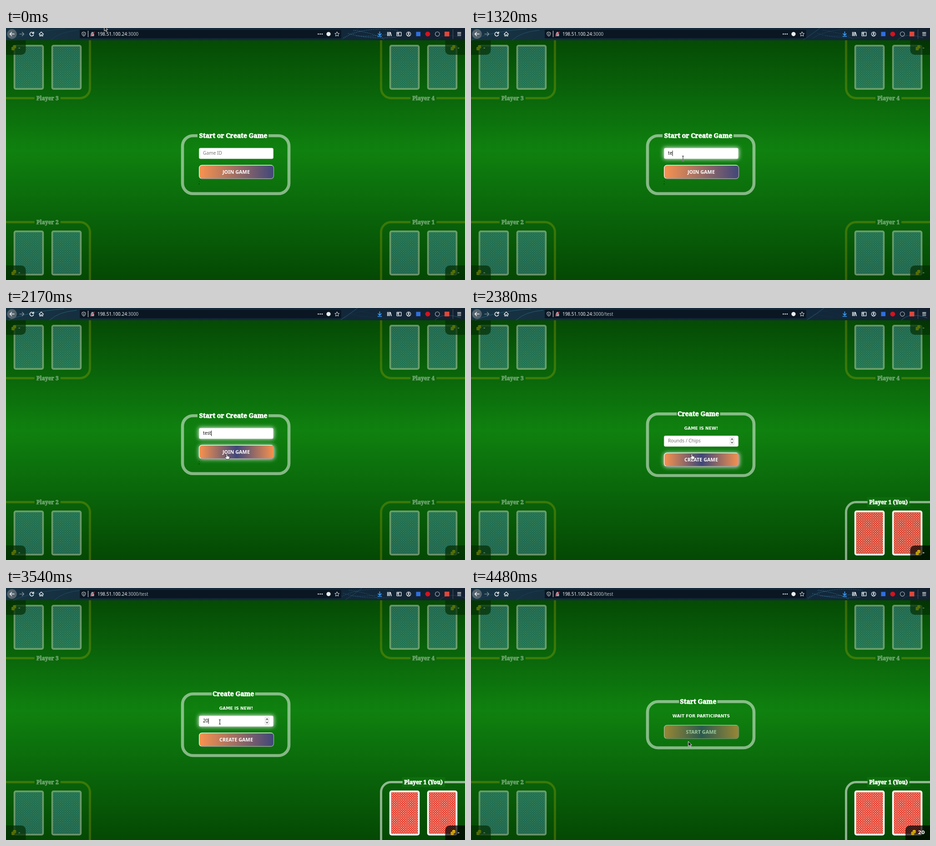
An HTML page for the animation above (4.58 s loop, 1009x555 px).

```html
<!DOCTYPE html>
<html lang="en">
<head>
<meta charset="utf-8">
<title>Card table</title>
<style>
  html, body { margin: 0; width: 100%; height: 100%; overflow: hidden; background: #064a06; }
  svg { display: block; width: 100%; height: 100%; }
  text { font-family: "Noto Sans", "Open Sans", sans-serif; white-space: pre; }
  .slab { font: 900 14px "Noto Serif", serif; fill: #fff; stroke: #fff; stroke-width: .85; text-anchor: middle; }
  .name { font-size: 12.1px; }
  .note { font: bold 9.15px "DejaVu Sans", sans-serif; fill: #fff; text-anchor: middle; }
  .chips { font: bold 10.8px "DejaVu Sans", sans-serif; fill: #fff; }
  .label { font-size: 10.9px; font-weight: 600; fill: #fff; text-anchor: middle; }
  .field { font-size: 10.2px; }
  .url { font-size: 9.95px; fill: #f4f6f8; }
  .icon { fill: none; stroke: #eef1f4; stroke-width: 1.3; stroke-linecap: round; stroke-linejoin: round; }
</style>
</head>
<body>
<svg id="stage" viewBox="0 0 1009 555"></svg>
<script>
const LOOP = 4580;
// [first, last, number of repaints]
const BURSTS = [[100, 460, 5], [670, 1130, 6], [1230, 1720, 6], [1800, 2280, 6],
  [2380, 2860, 6], [2940, 3250, 4], [3450, 3900, 6], [3990, 4480, 6]];
const STEPS = [0, ...BURSTS.flatMap(([a, b, n]) =>
  Array.from({ length: n }, (_, i) => Math.floor((a + (b - a) * i / (n - 1)) / 10) * 10))];

const CREATE_AT = 2170, START_AT = 4170;
// [time, x, y]
const POINTER = [[0, 216, -4], [60, 216, -4], [460, 476, 290], [600, 476, 290], [740, 469, 295],
  [850, 466, 287], [1420, 466, 287], [1720, 485, 324], [1900, 485.5, 321.8], [2470, 485.5, 321.8],
  [2570, 482, 314], [2860, 476, 307], [3150, 470, 295], [3630, 470, 295], [3900, 476, 320],
  [4000, 477, 330], [4080, 478.5, 337], [4580, 477.5, 338]];
const TYPED = [[1230, "t"], [1320, "te"], [1420, "tes"], [1520, "test"], [CREATE_AT, ""], [3450, "2"], [3540, "20"]];
const FOCUS = [[840, CREATE_AT], [3150, START_AT]];
const HOVER = [[1650, 2420], [3860, LOOP + 500]];

const clamp = v => Math.max(0, Math.min(1, v));
const $ = id => document.getElementById(id);
const show = (id, on) => $(id).setAttribute("display", on ? "inline" : "none");
const set = (id, attrs) => { for (const k in attrs) $(id).setAttribute(k, attrs[k]); };

// Rises and falls over a short ease at the ends of each window.
const windowed = (t, list, ease) => Math.max(...list.map(([a, b]) =>
  Math.min(clamp((t - a) / ease), 1 - clamp((t - b) / ease))));

function pointerAt(t) {
  const i = POINTER.findIndex(p => p[0] > t);
  const [a, x0, y0] = POINTER[i - 1], [b, x1, y1] = POINTER[i];
  const k = (t - a) / (b - a), e = k * k * (3 - 2 * k);
  return [x0 + (x1 - x0) * e, y0 + (y1 - y0) * e];
}

const defs = `<defs>
  <linearGradient id="felt" x2="0" y2="1">
    <stop stop-color="#054a05"/><stop offset=".46" stop-color="#0f810f"/><stop offset="1" stop-color="#044804"/>
  </linearGradient>
  <linearGradient id="bar"><stop stop-color="#173444"/><stop offset=".3" stop-color="#142a3b"/>
    <stop offset=".78" stop-color="#12283a"/><stop offset="1" stop-color="#13202f"/></linearGradient>
  <linearGradient id="sweep" gradientUnits="userSpaceOnUse" x1="425" x2="755" y1="0" y2="0">
    <stop stop-color="#f8924f"/><stop offset=".5" stop-color="#40477a"/><stop offset="1" stop-color="#f8924f"/>
  </linearGradient>
  <linearGradient id="bevel" x2="1" y2="1"><stop offset=".5" stop-color="#f1f1f1"/><stop offset=".5" stop-color="#a3a1a6"/></linearGradient>
  <filter id="blur" x="-20%" y="-100%" width="140%" height="300%"><feGaussianBlur stdDeviation="5"/></filter>
  ${[["blue", "#3a8cbe", "#88b9cf"], ["red", "#e03626", "#f8b3a6"]].map(([id, base, line]) => `
  <pattern id="${id}" width="5" height="5" patternUnits="userSpaceOnUse">
    <rect width="5" height="5" fill="${base}"/>
    <path d="M-1 -1L6 6M6 -1L-1 6" stroke="${line}" stroke-width=".95"/></pattern>`).join("")}
</defs>`;

// Rounded outline with an opening for the heading.
const outline = (top, bottom, gap) => `<path fill="none" stroke="#fff" stroke-opacity=".5" stroke-width="6.6"
  d="M${504.5 + gap[1]} ${top}H599a23 23 0 0 1 23 23V${bottom - 23}a23 23 0 0 1 -23 23H411a23 23 0 0 1 -23 -23V${top + 23}a23 23 0 0 1 23 -23H${504.5 + gap[0]}"/>`;

const heading = (x, y, s) => `<text class="slab" x="${x}" y="${y}">${s}</text>`;

const input = (id, y, hint) => `
  <rect id="${id}Glow" x="423" y="${y - 1}" width="166" height="26" rx="4" fill="#fff" filter="url(#blur)"/>
  <rect x="424.4" y="${y + .4}" width="163.2" height="23.6" rx="3" fill="#fff" stroke="#c9d6c9" stroke-width=".8"/>
  <text class="field" id="${id}Hint" x="433" y="${y + 15.4}" fill="#757575">${hint}</text>
  <text class="field" id="${id}Text" x="433" y="${y + 15.4}" fill="#111"></text>
  <path id="${id}Caret" stroke="#111" stroke-width="1"/>`;

const button = (id, y, s) => `
  <rect id="${id}Glow" x="423.5" y="${y - .5}" width="167" height="32" rx="7" fill="#fff" filter="url(#blur)"/>
  <rect x="424.7" y="${y + .2}" width="163.8" height="29.6" rx="6" fill="url(#sweep)" stroke="url(#bevel)" stroke-width="1.4"/>
  <text class="label" x="506" y="${y + 18.9}">${s}</text>`;

const spinner = `<g fill="#fff" stroke="#bbb" stroke-width=".7">
  <rect x="569.5" y="284.5" width="8.6" height="8.2" rx="2"/><rect x="569.5" y="292.7" width="8.6" height="8.2" rx="2"/></g>
  <path d="M571.8 290l2-2 2 2M571.8 295.4l2 2 2-2" fill="none" stroke="#222" stroke-width="1.3"/>`;

const pages = `
<g id="join">${outline(237.2, 364.8, [-83.5, 72.5])}${heading(499.7, 242.3, "Start or Create Game")}
  ${input("game", 264, "Game ID")}${button("joinBtn", 302, "JOIN GAME")}
  <text x="423.5" y="343" font-size="10" fill="#0a1a0a">;</text></g>
<g id="create">${outline(233.2, 369, [-52, 43])}${heading(499.7, 238.3, "Create Game")}
  <text class="note" x="506" y="268.4">GAME IS NEW!</text>
  ${input("rounds", 281, "Rounds / Chips")}${spinner}${button("createBtn", 319, "CREATE GAME")}</g>
<g id="start">${outline(250.3, 352, [-47, 37])}${heading(499.5, 255.3, "Start Game")}
  <text class="note" x="506" y="285.4">WAIT FOR PARTICIPANTS</text>
  <g opacity=".6">${button("startBtn", 302, "START GAME")}</g></g>`;

const coin = (x, y) => `<ellipse cx="${x}" cy="${y}" rx="3.7" ry="1.7"/>`;
const coins = (x, y) => `<g fill="#f4c20d" stroke="#4a4405" stroke-width=".5" transform="translate(${x} ${y})">
  ${coin(4, 9.5)}${coin(4, 7.4)}${coin(4, 5.3)}${coin(7.3, 5.4)}${coin(7.3, 3.4)}${coin(7.3, 1.4)}</g>`;

function seat(id, name, right, low, active) {
  const flip = `matrix(${right ? -1 : 1} 0 0 ${low ? -1 : 1} ${right ? 1009 : 0} ${low ? 582 : 0})`;
  const mid = right ? 917.7 : 91.3, y = low ? 432 : 158.6, row = low ? 533 : 38;
  const edge = active ? `stroke="#fff" stroke-opacity=".55"` : `stroke="#ffd700" stroke-opacity=".5"`;
  const half = active ? 46 : 28.5;
  const card = x => `<rect x="${x}" y="37" width="66.5" height="99" rx="5" fill="#fff"/>
    <rect x="${x + 3.7}" y="40.7" width="59.1" height="91.6" rx="1.5" fill="url(#${active ? "red" : "blue"})"/>`;
  const tab = w => `<path d="M0 27H${w}V49a10 10 0 0 1 -10 10H0Z" fill="#000" fill-opacity=".72" transform="${flip}"/>`;
  const purse = (x, w, s) => `${tab(w)}${coins(x, row)}<text class="chips" x="${x + 15.5}" y="${row + 9.3}">${s}</text>`;
  return `<g id="${id}" opacity="${active ? 1 : .4}">
    ${active ? `<rect x="870.5" y="416.5" width="95" height="22" fill="#128012" fill-opacity=".4"/>` : ""}
    <g transform="${flip}"><path fill="none" stroke-width="5" ${edge}
      d="M0 154.5H${91.3 - half}M${91.3 + half} 154.5H162.5a22 22 0 0 0 22 -22V27"/>${card(16.7)}${card(99.7)}</g>
    <text class="slab name" x="${mid}" y="${y}">${name}</text>
    <g id="${id}Empty">${purse(right ? 977 : 11.5, 43.5, "-")}</g>
    ${active ? `<g id="${id}Full">${purse(967, 54, "20")}</g>` : ""}</g>`;
}

const seats = seat("p3", "Player 3", 0, 0) + seat("p4", "Player 4", 1, 0) + seat("p2", "Player 2", 0, 1) +
  seat("p1", "Player 1", 1, 1) + seat("you", "Player 1 (You)", 1, 1, true);

const icon = (x, d, style = "") => `<path class="icon" transform="translate(${x} 13.3)" d="${d}" style="${style}"/>`;
const toolbar = `
<rect width="1009" height="27" fill="url(#bar)"/>
<g id="stars" fill="none" stroke="#4f9fd0" stroke-width="1.1" stroke-dasharray="1.2 2.6">
  <path d="M742 22Q785 -4 862 5M752 12Q800 26 858 20M764 5Q805 10 832 25M770 17Q795 20 840 14"/></g>
<g id="wisps" fill="none" stroke="#2f6d88" stroke-width="1">
  <path d="M8 27Q50 8 130 2M98 27Q118 8 158 5M945 27Q962 8 1002 22M738 26Q760 12 775 0"/></g>
<rect x="162" y="4" width="575" height="18.8" rx="2" fill="#0a1723"/>
<circle cx="13" cy="13.3" r="10.7" fill="#56646d"/>
${icon(13, "M5 0H-4.5M-.5 -4L-4.5 0L-.5 4", "stroke-width:1.6")}
${icon(35, "M-5 0H4.5M.5 -4L4.5 0L.5 4", "opacity:.5")}
${icon(56.5, "M3.6 -2A4.2 4.2 0 1 0 4 1.5M4.4 -4.6V-1.4H1.2", "stroke-width:1.6")}
${icon(77.5, "M-5 .3L0 -4.5L5 .3M-3.4 -.8V4.4H-1.1V1.5H1.1V4.4H3.4V-.8")}
${icon(171, "M0 -4.4L3.8 -3V0Q3.4 3.4 0 4.8Q-3.4 3.4 -3.8 0V-3ZM0 -2V2.5", "stroke-width:1")}
<path d="M180.5 6V20" stroke="#e7eaee" stroke-width="1"/>
${icon(190, "M-3 -.5H3V4H-3ZM-1.8 -.5V-2.4A1.8 1.8 0 0 1 1.8 -2.4V-.5", "fill:#9da5ab;stroke:#9da5ab")}
<path d="M185.5 18L194.5 8.5" stroke="#e8364f" stroke-width="1.4"/>
<text class="url" x="201" y="17">198.51.100.24<tspan fill="#b9c1c8">:3000<tspan id="path"></tspan></tspan></text>
<g fill="#e9edf0"><circle cx="686.5" cy="13.3" r="1.3"/><circle cx="690.7" cy="13.3" r="1.3"/><circle cx="694.9" cy="13.3" r="1.3"/>
  <circle cx="709" cy="13.3" r="4.6"/></g>
${icon(727.7, "M0 -4.8L1.5 -1.6L4.9 -1.2L2.4 1.2L3 4.6L0 2.9L-3 4.6L-2.4 1.2L-4.9 -1.2L-1.5 -1.6Z", "stroke-width:1")}
${icon(821.5, "M0 -5V2.5M-3.5 -.8L0 2.8L3.5 -.8M-4 5.2H4", "stroke:#3fa0ff;stroke-width:1.7")}
${icon(842.7, "M-4 -4V4M-1.5 -4V4M1 -4V4M2.4 -3.6L4.6 4", "stroke-width:1.5")}
${icon(864, "M-4.8 -4H4.8V4H-4.8ZM-.6 -4V4M-3.2 -1.8H-2M-3.2 .2H-2")}
${icon(885, "M4.7 0A4.7 4.7 0 1 1 -4.7 0A4.7 4.7 0 1 1 4.7 0M-2.6 3.2Q0 -.6 2.6 3.2M1.3 -1.6A1.3 1.3 0 1 1 -1.3 -1.6A1.3 1.3 0 1 1 1.3 -1.6")}
<rect x="901.5" y="8.5" width="9.6" height="9.6" fill="#2f6fe0"/>
<circle cx="927" cy="13.3" r="5.4" fill="#d3131f"/>
<circle cx="948.3" cy="13.3" r="4.8" fill="none" stroke="#b8bfc6" stroke-width="1.1"/>
<rect x="964" y="8" width="10.5" height="10.5" fill="#e0473a"/>
<path d="M982.5 3V24" stroke="#4a5963" stroke-width="1"/>
${icon(996.3, "M-3.6 -3.3H3.6M-3.6 0H3.6M-3.6 3.3H3.6", "stroke-width:1.4")}`;

const BEAM = "M-2 -5.3Q0 -5.3 0 -3.8Q0 -5.3 2 -5.3M0 -4V4M-2 5.3Q0 5.3 0 3.8Q0 5.3 2 5.3";
const cursor = `<g id="cursor" stroke-linejoin="round">
  <path id="arrow" d="M0 0V10.6L2.5 8.4L4.2 12.2L6 11.4L4.3 7.7H7.7Z" fill="#1c1c1c" stroke="#fff" stroke-width=".9"/>
  <g id="beam" fill="none"><path d="${BEAM}" stroke="#fff" stroke-width="2"/><path d="${BEAM}" stroke="#111" stroke-width="1"/></g>
  <path id="hand" fill="#fff" stroke="#1c1c1c" stroke-width=".8"
    d="M-1.3 1Q-1.3 -.4 0 -.4Q1.2 -.4 1.2 1V4.2L4.8 5Q6.2 5.4 6 7L5.2 11.2H-.8L-3.9 7.4Q-4.3 5.8 -3 5.9L-1.3 7.2Z"/></g>`;

$("stage").innerHTML = `${defs}<rect y="27" width="1009" height="528" fill="url(#felt)"/>${seats}${pages}${toolbar}${cursor}`;

function drawInput(id, y, text, t, focus, since) {
  $(id + "Text").textContent = text;
  show(id + "Hint", !text);
  set(id + "Glow", { opacity: focus * .8 });
  const x = 433.6 + (text ? $(id + "Text").getComputedTextLength() : 0);
  set(id + "Caret", { d: `M${x} ${y + 6}V${y + 18}` });
  show(id + "Caret", focus > 0 && (t - since) % 1200 < 600);
}

function draw(t) {
  const page = t < CREATE_AT ? "join" : t < START_AT ? "create" : "start";
  for (const p of ["join", "create", "start"]) show(p, p === page);
  const seated = page !== "join";
  show("p1", !seated);
  show("you", seated);
  set("you", { opacity: .4 + .6 * clamp((t - CREATE_AT) / 230) });
  show("youEmpty", page !== "start");
  show("youFull", page === "start");
  $("path").textContent = seated ? "/test" : "";

  const focus = windowed(t, FOCUS, 120), hover = windowed(t, HOVER, 150);
  const typed = TYPED.filter(k => k[0] <= t).pop() || [0, ""];
  const focused = FOCUS.filter(f => f[0] <= t).pop() || [0];
  const since = Math.max(typed[0], focused[0]);
  if (page === "join") drawInput("game", 264, typed[1], t, focus, since);
  if (page === "create") drawInput("rounds", 281, typed[1], t, focus, since);
  set("sweep", { x2: 425 + 164 * (2 - hover) });
  set("joinBtnGlow", { opacity: hover * .75 });
  set("createBtnGlow", { opacity: hover * .75 });
  set("startBtnGlow", { opacity: 0 });

  const [x, y] = pointerAt(t);
  const top = page === "join" ? 264 : 281;
  const shape = page !== "start" && hover > 0 && y > top + 37 ? "hand"
    : page !== "start" && x > 424 && y > top && y < top + 24 ? "beam" : "arrow";
  for (const s of ["hand", "beam", "arrow"]) show(s, s === shape);
  set("cursor", { transform: `translate(${x} ${y})` });

  const a = t / LOOP * 2 * Math.PI;
  set("stars", { opacity: .5 + .4 * Math.cos(a), transform: `translate(${10 * Math.sin(a)} 0)` });
  set("wisps", { opacity: .5 - .25 * Math.cos(a), transform: `translate(${-8 * Math.sin(a)} 0)` });
}

const begin = performance.now();
let last = -1;
function tick() {
  const t = (performance.now() - begin) % LOOP;
  const step = STEPS.filter(s => s <= t).pop();
  if (step !== last) draw(last = step);
  requestAnimationFrame(tick);
}
tick();
</script>
</body>
</html>
```
